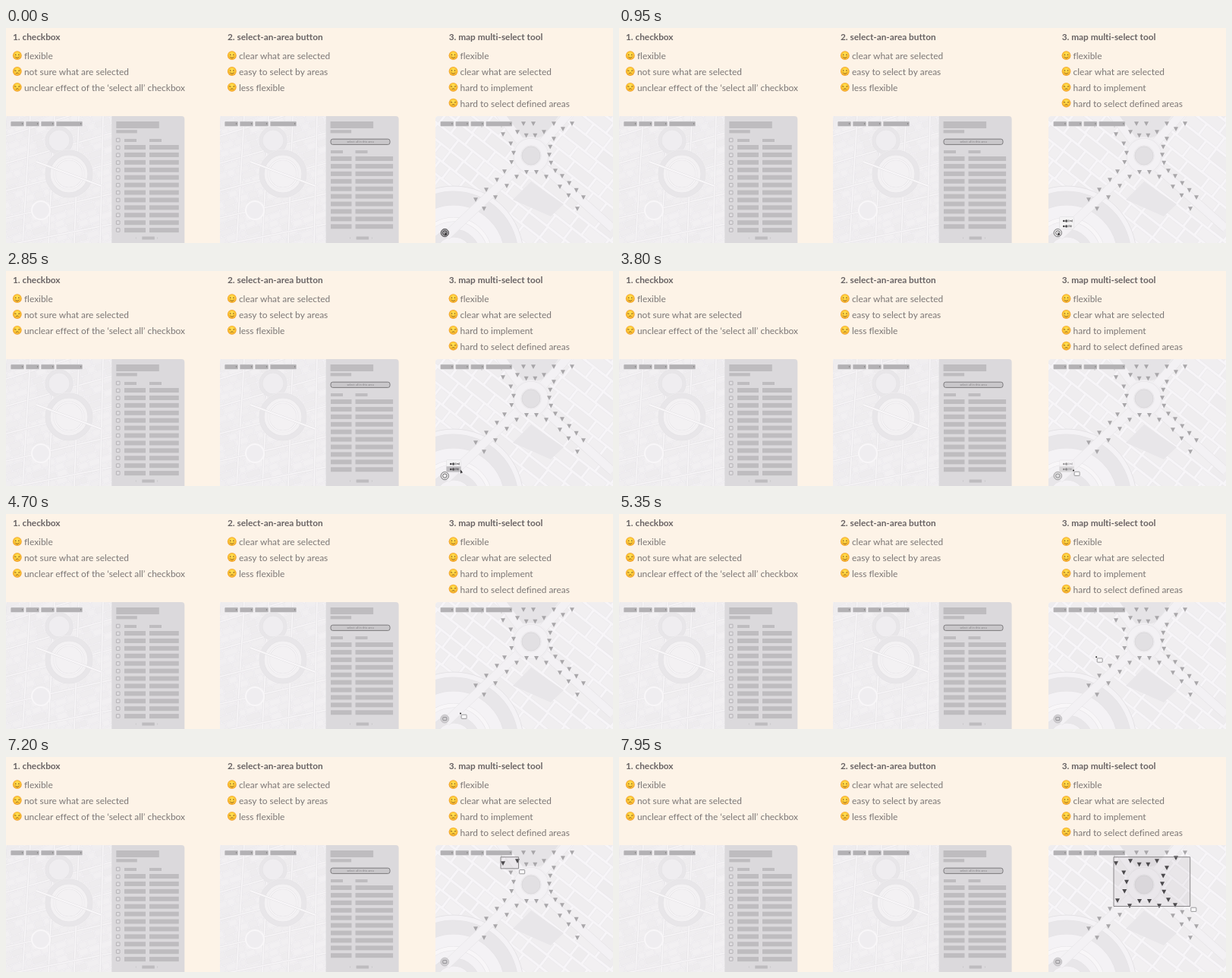
An HTML page with a canvas for the animation above (8000 ms loop, 800 by 283 pixels).

```html
<!DOCTYPE html>
<html lang="en">
<head>
<meta charset="utf-8">
<title>Ways to select on a map</title>
<style>
html, body { margin: 0; width: 100%; height: 100%; overflow: hidden; background: #fdf3e7; }
canvas { display: block; width: 100%; height: 100%; }
</style>
</head>
<body>
<canvas id="stage" width="800" height="283"></canvas>
<script>
const W = 800, H = 283, LOOP = 8000, TOP = 116;
const GREY = '#bebcbf', ROAD = '#f8f6f8', EDGE = '#e4e2e5', PARK = '#e8e6e9';
const ctx = document.getElementById('stage').getContext('2d');
const still = document.createElement('canvas');
still.width = W;
still.height = H;
let g = still.getContext('2d');

function rect(x, y, w, h, color) {
  g.fillStyle = color;
  g.fillRect(x, y, w, h);
}

function paint(fill, edge, width = 1) {
  if (fill) { g.fillStyle = fill; g.fill(); }
  if (edge) { g.strokeStyle = edge; g.lineWidth = width; g.stroke(); }
}

function round(x, y, w, h, r, ...style) {
  g.beginPath();
  g.roundRect(x, y, w, h, r);
  paint(...style);
}

function disc(x, y, r, ...style) {
  g.beginPath();
  g.arc(x, y, r, 0, Math.PI * 2);
  paint(...style);
}

function line(points, color, width) {
  g.beginPath();
  points.forEach(p => g.lineTo(...p));
  paint(null, color, width);
}

function shape(points, fill) {
  g.beginPath();
  points.forEach(p => g.lineTo(...p));
  g.closePath();
  paint(fill);
}

function road(points, width, color = ROAD) {
  line(points, EDGE, width + 1);
  line(points, color, width);
}

function ring(x, y, r, width, color = ROAD) {
  disc(x, y, r, null, EDGE, width + 1);
  disc(x, y, r, null, color, width);
}

function label(text, x, y, size, color, weight = 400, align = 'left') {
  g.font = `${weight} ${size}px Lato, "Open Sans", sans-serif`;
  g.textRendering = 'optimizeSpeed';
  g.textAlign = align;
  g.fillStyle = color;
  g.fillText(text, x, y);
}

function randomFrom(seed) {
  return () => (seed = (seed * 16807) % 2147483647) / 2147483647;
}

// City blocks on a turned grid around (cx, cy), inside the current clip.
function blocks(cx, cy, reach, angle, cw, ch, gap, seed) {
  const rnd = randomFrom(seed);
  g.save();
  g.translate(cx, cy);
  g.rotate(angle);
  for (let y = -reach; y < reach; y += ch) {
    for (let x = -reach - rnd() * cw; x < reach;) {
      const w = cw * (0.6 + rnd() * 0.9);
      const tone = 238 + Math.floor(rnd() * 5);
      g.beginPath();
      g.rect(x, y, w - gap, ch - gap);
      paint(`rgb(${tone},${tone - 2},${tone})`, EDGE, 0.4);
      x += w;
    }
  }
  g.restore();
}

function clipTo(x, y, w, h, r = 0) {
  g.beginPath();
  g.roundRect(x, y, w, h, r);
  g.clip();
}

function tags(x) {
  for (let i = 0; i < 4; i++) {
    const left = x + i * 20, w = i < 3 ? 17 : 34;
    round(left - 0.4, 122.8, w + 0.8, 6.9, 1, '#dcdadd');
    round(left, 123.2, w, 5.8, 0.6, '#b3b1b4');
    disc(left + w - 1.9, 126, 0.8, '#777');
  }
}

function smallMap(x) {
  g.save();
  clipTo(x, TOP, 140, H - TOP);
  g.translate(x, 0);
  rect(0, TOP, 140, H - TOP, '#f7f5f7');
  blocks(70, 200, 120, -0.32, 14, 9, 1.2, 71);
  for (let i = 0; i < 5; i++) {
    road([[0, 142 + i * 36], [140, 98 + i * 40]], 1.6);
    road([[i * 32, TOP], [i * 34 - 12, H]], 1.6);
  }
  disc(70, 148, 15, '#efedf0');
  ring(70, 148, 16, 4, PARK);
  disc(83, 192, 32, '#f3f1f3');
  ring(83, 192, 28, 6, PARK);
  ring(83, 192, 19, 1.5);
  road([[40, 176], [83, 192], [126, 208]], 2);
  disc(46, 240, 12, '#efedf0', '#f8f6f8', 2);
  g.restore();
  tags(x + 6.5);
}

function sidebar(x, firstRow, rows, left, split) {
  round(x, TOP, 96, 170, [0, 4, 0, 0], '#dbd9dc');
  rect(x + 6, 123, 56.5, 9, GREY);
  rect(x + 6, 134.2, 27.5, 4.2, GREY);
  for (const col of [left, split]) rect(col, firstRow - 8, 16, 4, GREY);
  for (let i = 0; i < rows; i++) {
    const y = firstRow + i * 9.92;
    rect(left, y, split - left - 5, 6, GREY);
    rect(split, y, x + 88.5 - split, 6, GREY);
  }
  rect(x + 40, 274.5, 16.5, 4, GREY);
  label('‹', x + 32, 278, 5, '#aaa', 400, 'center');
  label('›', x + 60.5, 278, 5, '#aaa', 400, 'center');
}

function bigMap() {
  const [cx, cy] = [692, 168];
  g.save();
  clipTo(566, TOP, 240, 170, [4, 0, 0, 0]);
  rect(566, TOP, 234, H - TOP, '#f7f5f8');
  blocks(cx, cy, 190, 0.66, 26, 18, 3.5, 9);
  shape([[660, TOP], [728, TOP], [709, 142], [692, 147], [674, 142]], '#e5e3e6');
  shape([[692, 202], [735, 232], [718, 248], [668, 226]], PARK);

  // Curved park in the lower left corner.
  disc(590, 300, 92, '#f4f2f5', EDGE);
  ring(590, 300, 76, 18, PARK);
  ring(590, 300, 48, 5);
  ring(590, 300, 30, 10, PARK);

  // Avenues meeting at the roundabout.
  const ends = [[650, 112], [742, 112], [580, 274], [800, 264]];
  ends.forEach(end => road([[cx, cy], end], 11, '#f3f1f4'));
  disc(cx, cy, 25, '#f0eef1');
  ring(cx, cy, 18, 9, '#f3f1f4');
  disc(cx, cy, 12, '#e2e0e3', '#dbd9dc');
  g.restore();
}

function face(x, y, happy) {
  const glow = g.createRadialGradient(x, y - 2, 1, x, y, 6);
  glow.addColorStop(0, '#ffdf50');
  glow.addColorStop(0.65, '#fcc534');
  glow.addColorStop(1, '#ee9a2a');
  disc(x, y, 5.9, glow);
  const ink = '#80511f';
  for (const s of [-1, 1]) {
    if (happy) disc(x + s * 2, y - 1, 0.8, ink);
    else line([[x + s * 3.7, y - 1.1], [x + s * 1.3, y - 0.6]], ink, 0.9);
  }
  g.beginPath();
  if (happy) g.arc(x, y + 0.4, 2.8, 0.4, Math.PI - 0.4);
  else g.arc(x, y + 4, 2, Math.PI + 0.4, -0.4);
  paint(null, ink, 0.8);
}

const columns = [
  { x: 9, title: '1. checkbox', good: 1,
    lines: ['flexible', 'not sure what are selected', 'unclear effect of the ‘select all’ checkbox'] },
  { x: 292, title: '2. select-an-area button', good: 2,
    lines: ['clear what are selected', 'easy to select by areas', 'less flexible'] },
  { x: 583.7, title: '3. map multi-select tool', good: 2,
    lines: ['flexible', 'clear what are selected', 'hard to implement', 'hard to select defined areas'] }
];

function drawStill() {
  rect(0, 0, W, H, '#fdf3e7');
  for (const c of columns) {
    label(c.title, c.x, 16, 11.8, '#686364', 700);
    c.lines.forEach((text, i) => {
      const y = 36.2 + i * 20.8;
      face(c.x + 5.8, y, i < c.good);
      label(text, c.x + 14.9, y + 5, 11.95, '#7b7675');
    });
  }

  smallMap(0);
  sidebar(139.3, 154, 12, 156, 189);
  for (let i = 0; i < 13; i++) {
    round(145.4, 145.2 + i * 9.87, 4.6, 4.6, 0.4, '#e0dee1', '#aaa8ab', 0.8);
  }

  smallMap(282);
  sidebar(421.6, 169, 10, 428, 460.5);
  round(428, 146.2, 78, 7.2, 2.6, '#c9c7ca', '#7b797c', 1);
  label('select all in this area', 467, 151.3, 4, '#858386', 400, 'center');

  bigMap();
}

// Evenly spread points between two ends, bent sideways by (bx, by).
function bow([x1, y1], [x2, y2], n, bx = 0, by = 0) {
  return Array.from({ length: n }, (_, i) => {
    const u = i / (n - 1), bend = 4 * u * (1 - u);
    return [x1 + (x2 - x1) * u + bx * bend, y1 + (y2 - y1) * u + by * bend];
  });
}

const pins = [
  ...bow([655, 140], [657, 189], 5, 13),
  ...bow([722, 146], [724, 188], 5, -7),
  ...bow([674, 137], [709, 137], 4, 0, 5),
  ...bow([673, 196], [712, 196], 4, 0, -7),
  ...bow([647, 200], [619, 226], 3),
  ...bow([660, 208], [630, 238], 3),
  ...bow([733, 195], [761, 223], 4),
  ...bow([730, 209], [753, 238], 3, 0, -3),
  ...bow([722, 126], [746, 126], 3, 0, 7),
  ...bow([682, 126], [695, 126], 2),
  ...bow([627, 128], [653, 128], 2)
];

const clamp = v => Math.max(0, Math.min(1, v));
const span = (t, a, b) => clamp((t - a) / (b - a));
const ease = p => p < 0.5 ? 2 * p * p : 1 - 2 * (1 - p) * (1 - p);

const START = [652, 131.7], DRAG = 6900, TOOL = 3600;
const moves = [
  { from: 1000, to: 1600, at: [599, 262.5] },
  { from: 4690, to: 5925, at: START },
  { from: DRAG, to: 7780, at: [752.7, 196.5] }
];

function pointer(t) {
  let [x, y] = [578.5, 269.5];
  for (const m of moves) {
    const p = ease(span(t, m.from, m.to));
    x += (m.at[0] - x) * p;
    y += (m.at[1] - y) * p;
  }
  return [x, y];
}

function drawPins(x, y, dragging) {
  for (const [px, py] of pins) {
    const inside = dragging && px > START[0] && px < x && py > START[1] && py - 1 < y;
    shape([[px - 3, py - 2.8], [px + 3, py - 2.8], [px, py + 3]], inside ? '#4c4a4d' : '#a8a6a9');
  }
}

function drawButton(t) {
  const [x, y] = [578.3, 269.6];
  const strong = 1 - span(t, TOOL, 4000);
  const pressed = 1 - span(t, 300, 500);
  disc(x, y, 5.4, '#d2d0d3', '#bab8bb', 0.8);
  round(x - 2.5, y - 2, 5, 4, 0.5, null, '#8d8b8e', 0.9);
  g.globalAlpha = strong;
  disc(x, y, 5, '#f1f0f1', '#777578', 0.9);
  disc(x, y, 2.7, null, '#555356', 0.9);
  g.globalAlpha = strong * pressed;
  disc(x, y, 5, '#aaa8ab', '#5c5a5d', 1);
  disc(x, y, 2.7, null, '#403e41', 1);
  g.globalAlpha = 1;
}

function drawMenu(t) {
  g.globalAlpha = span(t, 350, 600) * (1 - span(t, TOOL, 4000));
  round(580.5, 248.5, 19, 16.2, 1.2, '#f4f3f4', '#dddbde', 0.5);
  if (t >= 1500) rect(580.5, 257.2, 19, 7.3, GREY);
  ['m', 'b'].forEach((key, i) => {
    const y = 254 + i * 7;
    disc(586.3, y, 1.3, '#3c3a3d');
    round(588.5, y - 1.2, 2.4, 2.4, 0.3, '#5c5a5d', '#333', 0.5);
    label(`(${key})`, 592.3, y + 1.4, 4, '#39373a', 700);
  });
  g.globalAlpha = 1;
}

function drawPointer(x, y, t) {
  if (t < TOOL) {
    shape([[x, y - 1], [x, y + 4.3], [x + 1.3, y + 3.1], [x + 3.2, y + 3]], '#2c2a2d');
    return;
  }
  if (t < DRAG) disc(x, y, 1, '#222');
  round(x + 1.1, y + 1.7, 7, 5.2, 0.6, '#f8f7f8', '#858386', 0.8);
}

function draw(t) {
  const [x, y] = pointer(t);
  const dragging = t > DRAG;
  const area = [...START, x - START[0], y - START[1]];
  g.drawImage(still, 0, 0);
  g.save();
  clipTo(566, TOP, 234, H - TOP, [4, 0, 0, 0]);
  if (dragging) rect(...area, 'rgba(110,106,114,.07)');
  drawPins(x, y, dragging);
  tags(572.8);
  if (dragging) round(...area, 0, null, '#7d7b7e', 0.9);
  drawButton(t);
  drawMenu(t);
  drawPointer(x, y, t);
  g.restore();
}

drawStill();
g = ctx;

function tick() {
  draw(performance.now() % LOOP);
  requestAnimationFrame(tick);
}
tick();
</script>
</body>
</html>
```
